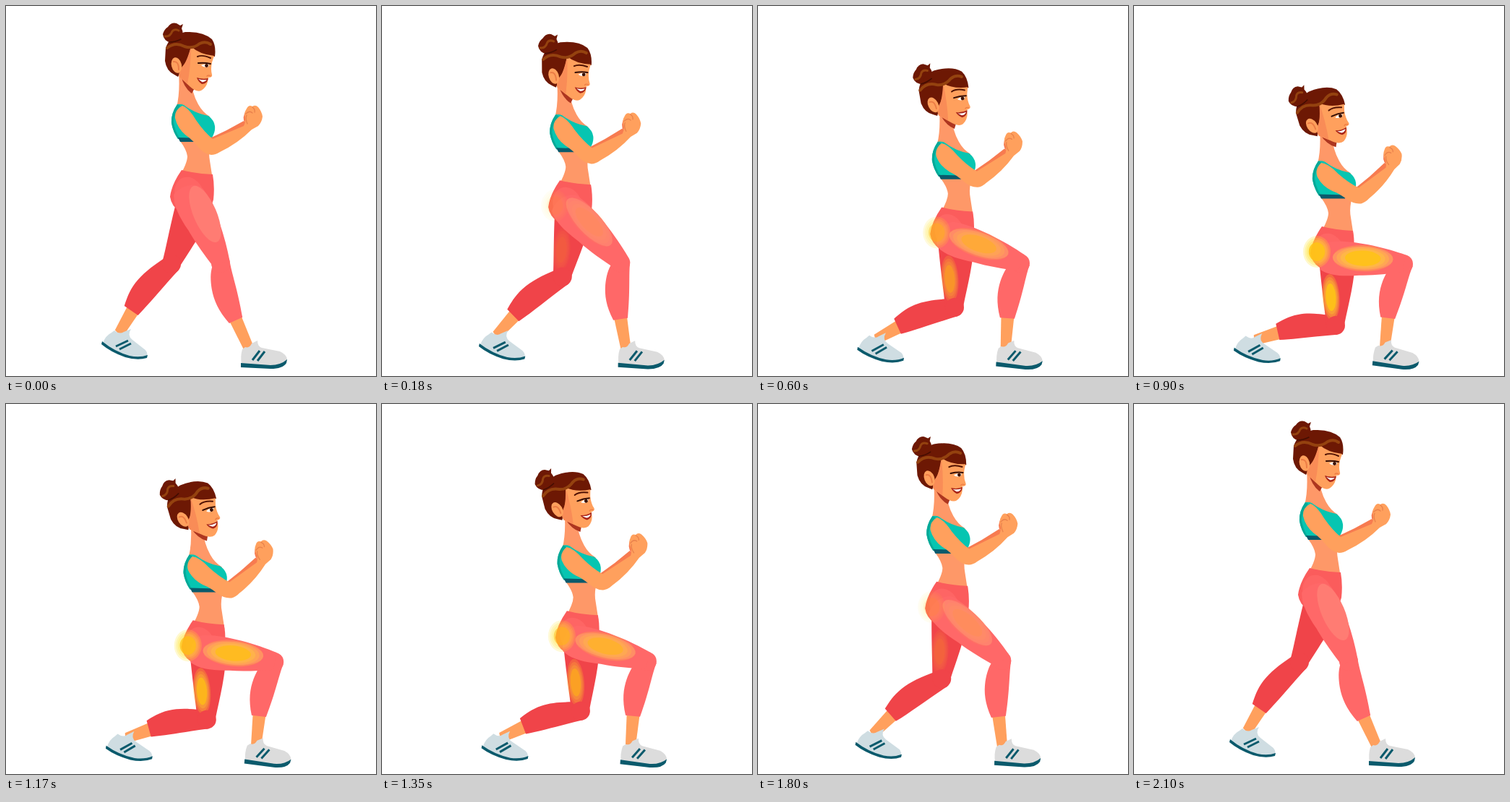
Recreate the animation shown at these times as an HTML page. Size 512x512 px, loop 2.25 s.

```html
<!DOCTYPE html>
<html lang="en">
<head>
<meta charset="utf-8">
<title>Lunge exercise</title>
<style>
  html, body { margin: 0; width: 100%; height: 100%; overflow: hidden; background: #fff; }
  svg { display: block; width: 100vw; height: 100vh; }
  .line { fill: none; stroke-linecap: round; stroke-linejoin: round; }
  .skin { fill: #ffa05d; }
  .body { fill: #fe9868; }
  .far { fill: #f77b50; }
  .near-leg { fill: #ff6868; }
  .back-leg { fill: #f04449; }
  .hair { fill: #6d1804; }
  .navy { fill: #0b5a6c; }
  .stripe { stroke: #0b5a6c; stroke-width: 3; stroke-linecap: butt; }
</style>
</head>
<body>
<svg viewBox="0 0 512 512">
  <!-- back leg -->
  <g id="backShin">
    <path class="skin" d="M78 14 L118 7 L120 -7 L78 -5Z"/>
    <path class="back-leg" d="M0 13 C20 20 35 24 50 24 C65 24 75 20 84 17 L83 -6 C60 -9 30 -10 0 -13Z"/>
  </g>
  <g id="backThigh">
    <path class="back-leg" d="M-5 -34 C30 -31 60 -20 88 -12 L88 13 C70 13 40 16 -5 17Z"/>
    <g id="hamGlow"></g>
  </g>
  <circle id="backKnee" class="back-leg" r="13"/>
  <g id="backShoe">
    <path fill="#cfdde2" d="M146 452 L150 449 Q157 455 163 451 L173 447 Q167 456 175 462 L189 473 Q197 478 195 485 Q185 488 172 486 Q152 481 134 466 Q138 456 146 452Z"/>
    <path class="navy" d="M133 464 Q150 478 171 484 Q185 487 196 483 L195 487 Q182 491 165 486 Q145 479 132 468Z"/>
    <path class="line stripe" d="M152 471 L169 463 M157 475 L173 467"/>
  </g>

  <!-- upper body -->
  <g id="torso">
    <path class="body" d="M239 92 L256 100 Q257 120 266 136 Q272 147 282 153 L286 182 Q279 198 282 214 L286 240 L240 236 Q251 217 251 208 Q250 199 241 187 L236 140 Q241 120 239 92Z"/>
    <path fill="#06c5b1" d="M237 136 Q228 149 229 162 Q231 174 238 184 L275 185 L285 182 Q290 174 289 166 Q288 158 280 152 Q262 149 246 137 Q242 135 237 136Z"/>
    <path fill="#07a897" d="M237 136 Q228 149 229 162 Q231 174 238 184 L241 184 Q233 172 232 160 Q233 148 241 138Z"/>
    <path class="navy" d="M238 182 L275 183 L274 188 L241 188Z"/>
  </g>
  <g id="arm">
    <path class="far" d="M280 184 Q305 173 329 159 L336 168 L292 194Z"/>
    <path class="far" d="M334 167 Q326 158 330 149 Q331 145 336 143 L344 160Z"/>
    <path class="skin" d="M244 138 Q233 144 234 155 Q237 169 249 179 Q258 185 265 194 Q274 205 284 206 Q290 206 296 202 Q321 190 340 171 L349 166 Q354 161 355 153 Q354 146 349 140 Q345 136 341 139 Q336 136 333 142 Q329 147 331 155 Q332 160 329 166 L286 184 Q274 174 263 158 Q253 141 244 138Z"/>
    <path class="line" stroke="#e9814c" stroke-width="1.3" d="M332 149 Q337 144 341 148 M341 140 Q345 143 344 147 M334 163 Q331 156 333 151"/>
  </g>
  <g id="head">
    <path fill="#ad3620" d="M242 96 Q252 106 262 112 L257 121 Q246 113 242 96Z"/>
    <path class="hair" d="M241 27 L245 25 L243 31 Q247 39 241 47 L228 51 Q218 48 217 39 Q219 32 224 29 Q229 22 236 24Z"/>
    <path class="hair" d="M221 58 Q227 40 248 36 Q273 35 285 46 Q291 55 289 70 L262 70 L250 88 L240 94 L238 98 L233 95 Q222 90 220 76Z"/>
    <path class="skin" d="M256 56 Q268 67 288 69 L285 78 Q283 88 285 95 Q286 99 280 99 L279 105 Q277 113 270 117 Q263 120 253 110 L240 98 Q238 91 244 84 Q252 76 256 56Z"/>
    <path fill="#f98c57" d="M256 56 Q256 82 251 108 L240 98 Q238 91 244 84 Q250 78 256 56Z"/>
    <path class="line" stroke="#94420f" stroke-width="4" d="M223 58 Q234 49 247 56 Q258 60 268 52 Q276 48 283 53"/>
    <path class="line" stroke="#94420f" stroke-width="3" d="M220 42 Q227 43 230 35 Q233 31 239 34"/>
    <path class="line" stroke="#430d02" stroke-width="1.5" d="M226 50 Q234 50 242 46"/>
    <ellipse class="skin" cx="236" cy="82" rx="7" ry="11" transform="rotate(-14 236 82)"/>
    <path class="line" stroke="#ec7d46" stroke-width="2" d="M232 77 Q239 76 239 88"/>
    <path class="line" stroke="#501204" stroke-width="2" d="M265 70 Q272 67 283 72"/>
    <path fill="#fff" d="M270 82 Q276 79 281 81 L280 84 Q274 86 270 82Z"/>
    <circle cx="277.5" cy="82.5" r="2.4" fill="#3b1206"/>
    <path class="line" stroke="#330d05" stroke-width="2" d="M266 79 Q275 78 283 80"/>
    <path class="line" stroke="#ed7b43" stroke-width="1.3" d="M278 97 Q280 95 283 97"/>
    <path fill="#a82418" d="M264 99 Q272 102 280 100 Q278 108 271 108 Q266 105 264 99Z"/>
    <path fill="#fff" d="M266 101 Q272 103 278 102 Q275 106 271 105Z"/>
  </g>

  <!-- front leg -->
  <g id="pelvis">
    <path fill="#fb5c5c" d="M243 227 Q262 232 286 233 Q289 250 287 268 L280 290 Q250 293 240 284 Q229 277 227 264 Q229 247 243 227Z"/>
    <ellipse cx="254" cy="262" rx="20" ry="26" fill="#ff6a68" opacity=".7" transform="rotate(-20 254 262)"/>
  </g>
  <g id="frontShin">
    <path class="skin" d="M76 -4 L124 -7 L124 7 L77 14Z"/>
    <path class="near-leg" d="M0 -13 C18 -10 40 -11 79 -5 L81 15 C60 24 45 25 30 23 C18 21 8 18 0 12Z"/>
  </g>
  <circle id="frontKnee" class="near-leg" r="13"/>
  <g id="frontThigh">
    <path class="near-leg" d="M-6 -18 C20 -25 70 -20 100 -13 L100 11 C80 16 60 21 40 23 C15 28 -2 28 -14 22 C-22 8 -18 -12 -6 -18Z"/>
    <g id="thighSpot">
      <ellipse rx="42" ry="16" fill="#ff7c73"/>
      <g id="thighGlow"></g>
    </g>
  </g>
  <g id="hipGlow"></g>
  <g id="frontShoe">
    <path fill="#dcdcdc" d="M327 475 L331 472 Q337 474 340 467 L348 463 Q348 471 354 473 L379 478 Q388 482 389 489 Q388 498 370 499 L326 496 Q324 485 327 475Z"/>
    <path class="navy" d="M325 494 L366 497 Q380 497 389 489 L388 494 Q383 502 366 502 L325 500Z"/>
    <path class="line stripe" d="M341 490 L351 477 M348 491 L358 478"/>
  </g>
</svg>
<script>
const $ = id => document.getElementById(id);
const LOOP = 2250, STEP = 30;
const clamp = v => Math.min(1, Math.max(0, v));
const bend = p => Math.sqrt(p + .03) - Math.sqrt(.03);

// Knee positions against lunge depth
const DEPTH = [0, .239, .386, .659, .761, 1];
const FRONT_X = [297, 337, 350, 363, 367, 373];
const FRONT_Y = [356, 355, 356, 356, 356, 357];
const BACK_X = [229, 254, 263, 272, 275, 279];
const BACK_Y = [357, 380, 395, 417, 425, 442];

function along(keys, p, warp = v => v) {
  let i = 0;
  while (i < DEPTH.length - 2 && p > DEPTH[i + 1]) i++;
  const a = warp(DEPTH[i]), b = warp(DEPTH[i + 1]);
  return keys[i] + (keys[i + 1] - keys[i]) * (warp(p) - a) / (b - a);
}

function place(id, transform) {
  $(id).setAttribute('transform', transform);
}

function limb(id, [x, y], [u, v], size) {
  const angle = Math.atan2(v - y, u - x) * 180 / Math.PI;
  const stretch = Math.hypot(u - x, v - y) / size;
  place(id, `translate(${x} ${y}) rotate(${angle}) scale(${stretch} 1)`);
}

function rings(id, cx, cy, rx, ry) {
  const fills = ['#ffe128', '#ffe128', '#ffe128', '#ffc414'];
  const sizes = [1, .87, .74, .59], alpha = [.24, .24, .26, .85];
  $(id).innerHTML = sizes.map((s, i) =>
    `<ellipse cx="${cx}" cy="${cy}" rx="${rx * s}" ry="${ry * s}" fill="${fills[i]}" opacity="${alpha[i]}"/>`).join('');
}

rings('hamGlow', 50, 4, 31, 12);
rings('thighGlow', 0, 0, 42, 18);
rings('hipGlow', 236, 262, 19, 22);

function draw(t) {
  let p, lag = 0;
  if (t < 1050) {
    p = clamp((t - 20) / 880);
  } else {
    const u = clamp((t - 1050) / 1050);
    p = 1 - (u + u * u * (3 - 2 * u)) / 2;
    lag = 3 * Math.sin(Math.PI * u);
  }
  const e = 1 - (1 - p) ** 2;

  const frontHip = [258 + 17 * p, 265 + 80 * p];
  const frontKnee = [along(FRONT_X, p, bend), along(FRONT_Y, p)];
  const frontAnkle = [335 + 13 * p, 470 - p];
  const backHip = [252 + 21 * p, 275 + 76 * p];
  const backKnee = [along(BACK_X, p, bend), along(BACK_Y, p)];
  const backAnkle = [157 + 11 * p, 452 + 10 * e];

  limb('frontThigh', frontHip, frontKnee, 99);
  limb('frontShin', frontKnee, frontAnkle, 118);
  limb('backThigh', backHip, backKnee, 88);
  limb('backShin', backKnee, backAnkle, 117);
  place('frontKnee', `translate(${frontKnee})`);
  place('backKnee', `translate(${backKnee})`);
  place('frontShoe', `translate(${5 * e} ${2 * e}) rotate(${5 * p} 380 495)`);
  place('backShoe', `translate(${6 * e} ${6.5 * e}) rotate(${-4 * e} 165 470)`);

  const lift = `translate(${18 * p} ${78.5 * p})`;
  const hips = `translate(${17 * p} ${78 * p})`;
  place('torso', lift);
  place('arm', `${lift} rotate(${-14 * p} 245 150)`);
  place('head', `translate(${19.7 * p} ${76.5 * p}) rotate(${-20 * p - lag} 252 112)`);
  place('pelvis', hips);
  place('hipGlow', hips);
  place('thighSpot', `translate(${28 + 14 * p} ${-7 + 6 * p}) rotate(${-5 * p})`);
  for (const id of ['hamGlow', 'thighGlow', 'hipGlow']) $(id).setAttribute('opacity', p);
}

const start = performance.now();
function tick() {
  const t = (performance.now() - start) % LOOP;
  draw(Math.floor(t / STEP) * STEP);
  requestAnimationFrame(tick);
}
tick();
</script>
</body>
</html>
```
